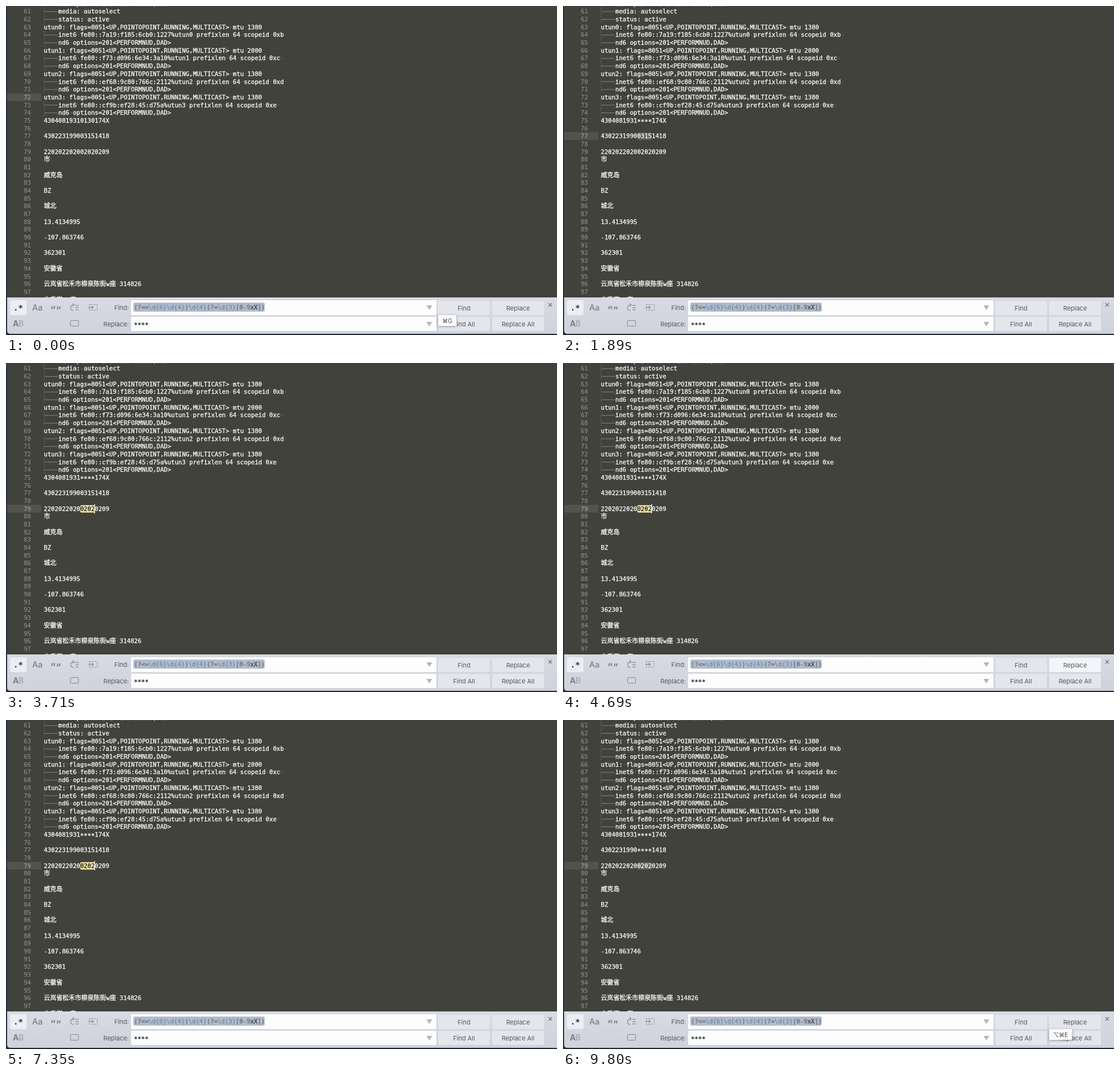
Recreate the animation shown at these times as an HTML page with a canvas. Size 969 by 578 pixels, loop 9870 ms.

```html
<!DOCTYPE html>
<html lang="en">
<head>
<meta charset="utf-8">
<title>Regex find and replace</title>
<style>
  html, body { margin: 0; width: 100%; height: 100%; overflow: hidden; background: #41423c; }
  canvas { display: block; }
</style>
</head>
<body>
<canvas id="stage" width="969" height="578"></canvas>
<script>
const ctx = document.getElementById('stage').getContext('2d');
const LOOP = 9870, STEP = 70;
const CELL = 6.395, WIDE = 10.95, PITCH = 13.68, LEFT = 66.5, FIRST = 60;
const MONO = '"DejaVu Sans Mono", "Liberation Mono", monospace';
const CJK = '"Noto Sans CJK SC", "Noto Sans CJK", "Noto Sans CJK JP", sans-serif';
const UI = 'Inter, Roboto, sans-serif';
const CODE = '10.62px ' + MONO;

const tunnels = [
  ['7a19:f185:6cb0:1227', 1380, 'b'],
  ['f73:d096:6e34:3a10', 2000, 'c'],
  ['ef68:9c80:766c:2112', 1380, 'd'],
  ['cf9b:ef28:45:d75a', 1380, 'e'],
].flatMap(([ip, mtu, scope], i) => [
  `utun${i}: flags=8051<UP,POINTOPOINT,RUNNING,MULTICAST> mtu ${mtu}`,
  `\tinet6 fe80::${ip}%utun${i} prefixlen 64 scopeid 0x${scope} `,
  '\tnd6 options=201<PERFORMNUD,DAD>',
]);
const lines = [
  '\tnd6 options=201<PERFORMNUD,DAD>', '\tmedia: autoselect', '\tstatus: active', ...tunnels,
  '43040819310130174X', '', '430223199003151418', '', '220202202002020209',
  '市', '', '威克岛', '', 'BZ', '', '城北', '', '13.4134995', '', '-107.863746', '',
  '362301', '', '安徽省', '', '云岚省松禾市柳泉陈街w座 314826', '', '宁禾街 c座',
];

// Each scene holds until the next one starts.
const scenes = [
  { at: 0, row: 72, masked: [], tip: 'find' },
  { at: 560, row: 75, masked: [], mark: 'found' },
  { at: 1750, row: 77, masked: [75], mark: 'selected' },
  { at: 2450, row: 77, masked: [75], mark: 'selected', tip: 'find' },
  { at: 3360, row: 79, masked: [75], mark: 'found', caret: true },
  { at: 4270, row: 79, masked: [75], mark: 'found', caret: true, hover: true },
  { at: 5600, row: 79, masked: [75], mark: 'found', caret: true },
  { at: 7910, row: 77, masked: [75], mark: 'found' },
  { at: 8750, row: 79, masked: [75, 77], mark: 'selected' },
  { at: 9450, row: 79, masked: [75, 77], mark: 'selected', tip: 'replace' },
];

const rowTop = n => (n - 61) * PITCH + 2.8;
const baseline = n => (n - 61) * PITCH + 13.4;

function box(x, y, w, h, color, radius = 0) {
  ctx.fillStyle = color;
  ctx.beginPath();
  ctx.roundRect(x, y, w, h, radius);
  ctx.fill();
}

function label(text, x, y, font, color, align = 'left') {
  ctx.font = font;
  ctx.fillStyle = color;
  ctx.textAlign = align;
  ctx.fillText(text, x, y);
}

function path(color, width, points) {
  ctx.strokeStyle = color;
  ctx.lineWidth = width;
  ctx.beginPath();
  points.forEach(([x, y], i) => i ? ctx.lineTo(x, y) : ctx.moveTo(x, y));
  ctx.stroke();
}

// Monospaced text on a grid, with visible tabs and spaces.
function codeLine(text, y, colorAt, x = LEFT) {
  [...text].forEach((ch, i) => {
    if (ch === '\t') {
      box(x + 1, y - 4, 4 * CELL - 2, 1, '#85867f');
      for (let k = 0; k < 4; k++) box(x, y - 10 + k * 3.4, 1, 1.5, '#74756e');
      x += 4 * CELL;
    } else if (ch === ' ') {
      box(x + 2.6, y - 4.3, 1.3, 1.3, '#85867f');
      x += CELL;
    } else {
      const wide = ch > '\u2e80';
      const drop = ch === '*' ? 2 : 0; // centre asterisks on the digits
      label(ch, x, y + drop, wide ? '11px ' + CJK : CODE, colorAt(i));
      ctx.strokeStyle = ctx.fillStyle;
      ctx.lineWidth = 0.35;
      ctx.strokeText(ch, x, y + drop);
      x += wide ? WIDE : CELL;
    }
  });
}

function drawEditor(scene) {
  box(0, 0, 969, 578, '#41423c');
  box(2, rowTop(scene.row), 60, PITCH, '#52534b');
  const start = LEFT + 10 * CELL;
  if (scene.mark) {
    const color = scene.mark === 'found' ? '#f7e8a4' : '#5f605a';
    box(start, rowTop(scene.row) + 0.6, 4 * CELL, 13, color, 2.5);
  }
  lines.forEach((line, i) => {
    const n = FIRST + i;
    const text = scene.masked.includes(n) ? line.slice(0, 10) + '****' + line.slice(14) : line;
    const found = n === scene.row && scene.mark === 'found';
    label(n, 44, baseline(n), CODE, n === scene.row ? '#a9aaa3' : '#94958e', 'right');
    codeLine(text, baseline(n), k => found && k > 9 && k < 14 ? '#24251f' : '#f6f6f2');
  });
  if (scene.caret) box(start + 4 * CELL - 1, rowTop(scene.row) - 1, 1.5, 16, '#fafaf6');
}

function drawIcons() {
  box(7, 517, 29, 26, '#eceef3', 2);
  label('.*', 13, 535, 'bold 14px ' + MONO, '#303136');
  label('Aa', 46, 535, '500 14.5px ' + UI, '#7e8087');
  label('“', 78, 540, 'bold 17px ' + UI, '#7e8087');
  label('”', 88, 541, 'bold 17px ' + UI, '#7e8087');
  label('A', 12, 563, 'bold 14px ' + UI, '#7e8087');
  label('B', 22, 563, 'bold 14px ' + UI, '#acaeb5');

  const ink = '#85878e';
  ctx.strokeStyle = ink;
  ctx.lineWidth = 1.2;
  ctx.beginPath();
  ctx.arc(118.5, 530, 5, Math.PI * 0.5, Math.PI * 1.5);
  ctx.stroke();
  path(ink, 1.2, [[117, 522.5], [120, 525], [117, 527.5]]);
  [526, 530, 534].forEach(y => path(ink, 1.2, [[122, y], [128, y]]));

  ctx.lineWidth = 1;
  ctx.setLineDash([2, 1.3]);
  ctx.strokeRect(146.5, 524.5, 14, 10);
  ctx.setLineDash([]);
  path(ink, 1.2, [[145, 529.5], [153, 529.5]]);
  path(ink, 1.2, [[151, 527], [153.5, 529.5], [151, 532]]);
  ctx.lineWidth = 1;
  ctx.beginPath();
  ctx.roundRect(113.5, 552.5, 14, 10, 1);
  ctx.stroke();
}

function field(name, y, height) {
  label(name, 216, y + 17, '11px ' + UI, '#565860', 'right');
  box(220, y, 537, height, '#fdfdfe', 1);
  ctx.fillStyle = '#b4b5ba';
  ctx.beginPath();
  ctx.moveTo(739.5, y + 9);
  ctx.lineTo(749.5, y + 9);
  ctx.lineTo(744.5, y + 17);
  ctx.fill();
}

function button(text, x, y, hover) {
  box(x, y, 91, 25, hover ? '#f4f5f8' : '#e4e6ec', 2);
  label(text, x + 45.5, y + 16.5, '11px ' + UI, '#555760', 'center');
}

function tooltip(text, x, width) {
  ctx.save();
  ctx.shadowColor = 'rgba(0,0,0,.35)';
  ctx.shadowBlur = 4;
  ctx.shadowOffsetY = 1;
  box(x, 543, width, 19, '#fbfbfc', 1);
  ctx.restore();
  label(text, x + width / 2, 556.5, '10px Inter, "DejaVu Sans", sans-serif', '#45464c', 'center');
}

function drawPanel(scene) {
  const shade = ctx.createLinearGradient(0, 512, 0, 576);
  shade.addColorStop(0, '#d8dbe3');
  shade.addColorStop(1, '#cfd2db');
  box(0, 512, 969, 66, '#1f2833');
  box(2, 512, 967, 64, shade, [0, 0, 0, 5]);
  drawIcons();

  field('Find:', 517, 26);
  field('Replace:', 546, 25);
  box(224, 521, 231, 16, '#b3bbc8', 3);
  const regex = '(?<=\\d{6}\\d{4})\\d{4}(?=\\d{3}[0-9xX])';
  const literals = regex.indexOf('xX');
  const escapes = new Set();
  for (const m of regex.matchAll(/\\d\{\d\}/g))
    for (let k = 0; k < m[0].length; k++) escapes.add(m.index + k);
  codeLine(regex, 532.5, i =>
    escapes.has(i) ? '#6990b6' : i === literals || i === literals + 1 ? '#3f444b' : '#66727f', 225);
  codeLine('****', 561.5, () => '#303136', 225);

  button('Find', 760, 518);
  button('Replace', 855, 518, scene.hover);
  button('Find All', 760, 546);
  button('Replace All', 855, 546);
  path('#73757c', 1.2, [[954, 522], [960, 528]]);
  path('#73757c', 1.2, [[960, 522], [954, 528]]);

  if (scene.tip === 'find') tooltip('⌘G', 760, 32);
  if (scene.tip === 'replace') tooltip('⌥⌘E', 855, 40);
}

function draw(now) {
  const t = Math.floor((now % LOOP) / STEP) * STEP;
  const scene = scenes.findLast(s => s.at <= t);
  drawEditor(scene);
  drawPanel(scene);
  box(0, 0, 2, 578, '#27323e');
  requestAnimationFrame(draw);
}
requestAnimationFrame(draw);
</script>
</body>
</html>
```
